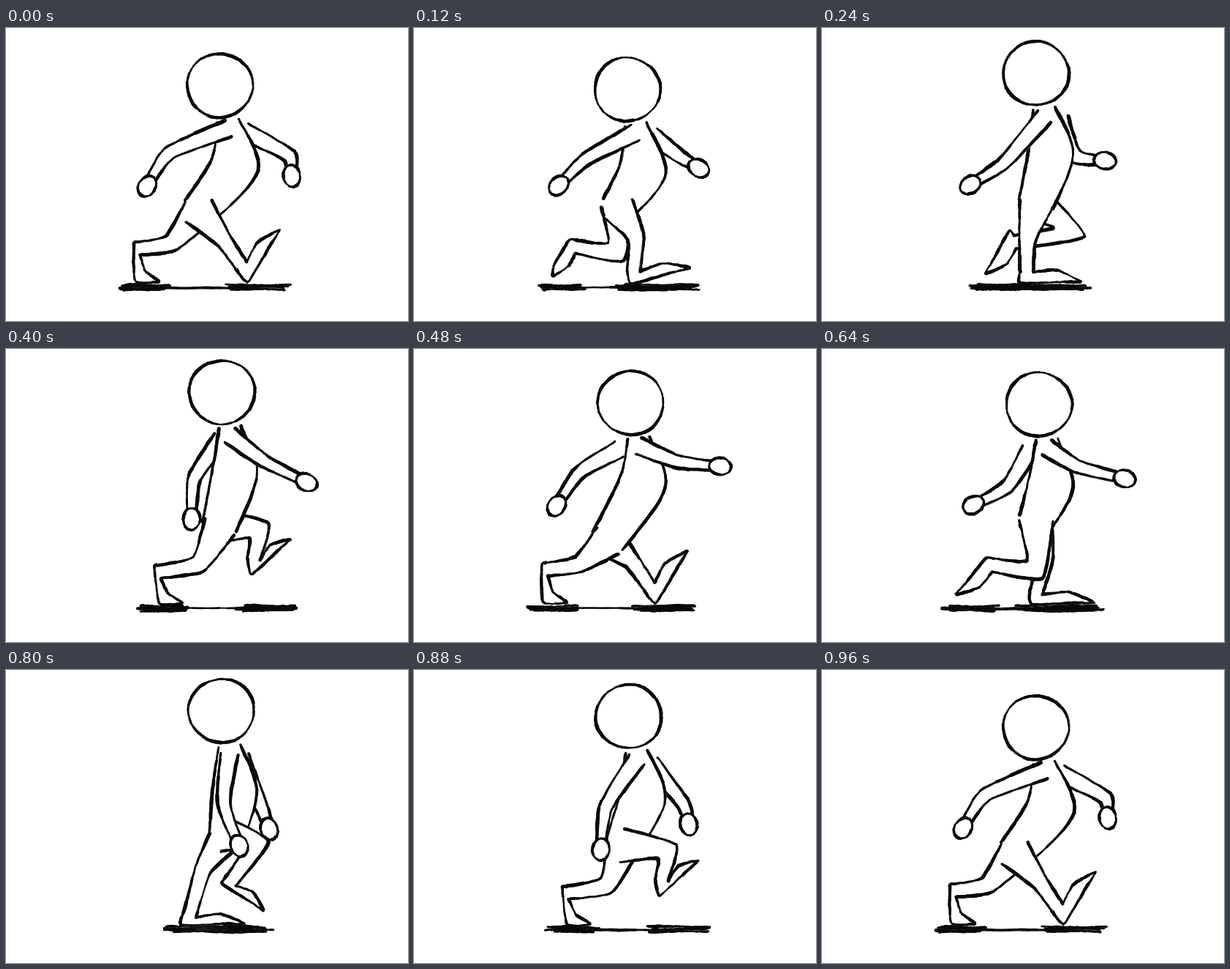
Recreate the animation shown at these times as an HTML page with a canvas. Size 550 by 400 pixels, loop 1000 ms.

```html
<!DOCTYPE html>
<html lang="en">
<head>
<meta charset="utf-8">
<title>Walk cycle</title>
<style>
html, body { margin: 0; width: 100%; height: 100%; overflow: hidden; background: #fff; }
canvas { display: block; }
</style>
</head>
<body>
<canvas id="stage" width="550" height="400"></canvas>
<script>
const ctx = document.getElementById('stage').getContext('2d');
const STEP = 40, LOOP = 1000, CYCLE = 960, FLOOR = 349, TAU = 2 * Math.PI;

// Key joints: time, then x,y pairs. Both legs share one track, half a cycle apart.
const HIP = [
  [0, 264, 250], [240, 293, 240], [400, 292, 243],
  [480, 265, 262], [640, 293, 235], [800, 302, 226]
];
// knee, ankle, heel, toe
const LEG = [
  [0, 298, 290, 322, 324, 331, 347, 374, 276],
  [160, 305, 285, 293, 333, 287, 348, 372, 346],
  [240, 281, 290, 280, 333, 271, 348, 354, 346],
  [320, 270, 272, 251, 335, 240, 348, 326, 346],
  [400, 263, 294, 210, 304, 203, 298, 241, 347],
  [480, 225, 294, 182, 301, 175, 295, 209, 346],
  [640, 291, 301, 234, 295, 224, 286, 184, 335],
  [720, 338, 279, 264, 292, 256, 277, 224, 335],
  [800, 342, 240, 307, 289, 296, 292, 352, 328],
  [880, 346, 248, 339, 286, 336, 308, 389, 260]
];
// elbow, hand
const NEAR_ARM = [
  [0, 223, 171, 193, 216], [240, 249, 184, 203, 214], [400, 353, 153, 411, 182],
  [480, 361, 154, 419, 160], [640, 349, 160, 414, 177], [800, 298, 182, 319, 240]
];
const FAR_ARM = [
  [0, 387, 174, 391, 202], [240, 347, 175, 387, 181], [400, 258, 176, 254, 232],
  [480, 226, 169, 195, 214], [640, 253, 188, 207, 213], [800, 350, 188, 360, 217]
];

let seed = 1;
const rand = () => (seed = seed * 16807 % 2147483647) / 2147483647;
const wob = a => (rand() * 2 - 1) * a;
const clamp = v => Math.max(0, Math.min(1, v));
const lerp = (a, b, u) => a + (b - a) * u;
const mid = (p, q, u) => [lerp(p[0], q[0], u), lerp(p[1], q[1], u)];
const move = (p, dir, d) => [p[0] + dir[0] * d, p[1] + dir[1] * d];
const unit = (p, q) => {
  const d = Math.hypot(q[0] - p[0], q[1] - p[1]) || 1;
  return [(q[0] - p[0]) / d, (q[1] - p[1]) / d];
};

// Joints at time t, each swinging in an arc around the pivot.
function sample(track, t, pivot) {
  t %= CYCLE;
  const i = track.findLastIndex(k => k[0] <= t), a = track[i];
  const b = track[(i + 1) % track.length];
  const u = (t - a[0]) / ((b[0] || CYCLE) - a[0]), out = [];
  const polar = (k, j) => {
    const x = k[j] - pivot[0], y = k[j + 1] - pivot[1];
    return [Math.hypot(x, y), Math.atan2(x, y)];
  };
  for (let j = 1; j < a.length; j += 2) {
    const [r, th] = mid(polar(a, j), polar(b, j), u);
    out.push([pivot[0] + r * Math.sin(th), Math.min(FLOOR, pivot[1] + r * Math.cos(th))]);
  }
  return out;
}

// Front and back outline of a chain of joints with the given thicknesses.
function sides(joints, widths) {
  const last = joints.length - 1, front = [], back = [];
  joints.forEach((p, i) => {
    const a = unit(joints[Math.max(0, i - 1)], joints[Math.max(1, i)]);
    const b = unit(joints[Math.min(last - 1, i)], joints[Math.min(last, i + 1)]);
    const dir = unit([0, 0], [a[0] + b[0], a[1] + b[1]]);
    const miter = Math.max(.5, dir[0] * a[0] + dir[1] * a[1]);
    const normal = [dir[1], -dir[0]], d = widths[i] / 2 / miter;
    front.push(move(p, normal, d));
    back.push(move(p, normal, -d));
  });
  return [front, back];
}

function spline(pts, tension) {
  const out = [], n = pts.length, at = i => pts[Math.max(0, Math.min(n - 1, i))];
  for (let i = 0; i < n - 1; i++) {
    const [p, a, b, q] = [at(i - 1), at(i), at(i + 1), at(i + 2)];
    for (let s = 0; s < 10; s++) {
      const u = s / 10, v = u * u, w = v * u;
      out.push([0, 1].map(k =>
        a[k] * (2 * w - 3 * v + 1) + b[k] * (3 * v - 2 * w) +
        tension / 2 * ((b[k] - p[k]) * (w - 2 * v + u) + (q[k] - a[k]) * (w - v))));
    }
  }
  return [...out, pts[n - 1]];
}

// One pass of a brush whose pressure drifts along the way.
function brush(pts, width, color) {
  const phase = rand() * TAU, freq = .25 + rand() * .2;
  ctx.strokeStyle = color;
  for (let i = 1; i < pts.length; i++) {
    ctx.lineWidth = Math.max(.6, width * (1 + .3 * Math.sin(phase + i * freq)) + wob(.6));
    ctx.beginPath();
    ctx.moveTo(...pts[i - 1]);
    ctx.lineTo(...pts[i]);
    ctx.stroke();
  }
}

function ink(curve, width = 3.8) {
  const dx = wob(1.6), dy = wob(1);
  brush(curve.map(([x, y]) => [x + dx, y + dy]), 1.6, '#555');
  brush(curve.map(([x, y]) => [x + wob(.4), y + wob(.4)]), width, '#0a0a0a');
}

function fill(pts) {
  ctx.fillStyle = '#fff';
  ctx.beginPath();
  pts.forEach(p => ctx.lineTo(...p));
  ctx.fill();
}

function limb(joints, widths, tension) {
  const [front, back] = sides(joints, widths).map(s => spline(s, tension));
  fill([...front, ...back.toReversed()]);
  ink(front);
  ink(back);
}

function oval([cx, cy], rx, ry, tilt = 0, width = 3.6) {
  const c = Math.cos(tilt), s = Math.sin(tilt), start = rand() * TAU;
  const ring = Array.from({ length: 45 }, (_, i) => {
    const th = start + i * TAU / 44, swell = 1 + .012 * Math.sin(3 * th + start);
    const x = rx * swell * Math.cos(th), y = ry * swell * Math.sin(th);
    return [cx + x * c - y * s, cy + x * s + y * c];
  });
  fill(ring);
  ink(ring, width);
}

function drawLeg(hip, [knee, ankle, heel, toe]) {
  const chain = [hip, knee, ankle], widths = [46, 22, 18];
  const [front, back] = sides(chain, widths).map(s => s[2]);
  const along = unit(heel, toe), sole = [-along[1], along[0]];
  // A raised heel over a planted toe bends the foot at the ball.
  const push = 32 * clamp(along[1]) * clamp((toe[1] - 337) / 8);
  const [bx, by] = move(mid(heel, toe, .7), sole, push);
  const instep = move(mid(front, toe, .5), sole, push * .6 - 9);
  const foot = spline([front, instep, toe, [bx, Math.min(FLOOR, by)], heel, back], .5);
  fill(foot);
  ink(foot, 3.4);
  limb(chain, widths, .5);
}

function drawArm(shoulder, [elbow, hand]) {
  const [x, y] = unit(elbow, hand);
  limb([shoulder, elbow, hand], [24, 17, 12], .6);
  oval(hand, 15, 11.5, Math.atan2(y, x), 3.2);
}

function drawGround(feet) {
  const streak = (from, to, y, w) => ink(spline(
    [[from + wob(8), y + wob(1)], [(from + to) / 2, y + wob(1)], [to + wob(8), y + wob(1)]], 1), w);
  const span = pts => {
    const xs = pts.map(p => p[0]);
    return [Math.min(...xs) - 16, Math.max(...xs) + 8];
  };
  streak(...span(feet.flat()), 354, 3);
  for (const foot of feet)
    for (let y = 351; y < 358; y += 2) streak(...span(foot), y, 3.4);
}

function draw(step) {
  const t = step * STEP, a = TAU * t / CYCLE;
  seed = 977 + step * 7919;
  for (let i = 0; i < 4; i++) rand();

  const head = [
    294.5 - 2 * Math.cos(a) - 1.5 * Math.sin(a),
    69 + 7 * Math.cos(2 * a) + 13 * Math.sin(2 * a) + 2.5 * Math.cos(a)
  ];
  const neck = [head[0] + 11, head[1] + 48], chest = [313, head[1] + 108];
  const [hip] = sample(HIP, t, [290, 130]);
  const [nearLeg, farLeg] = [0, CYCLE / 2].map(lag => sample(LEG, t + lag, [290, 240]));
  const [nearArm, farArm] = [NEAR_ARM, FAR_ARM].map(track => sample(track, t, [300, 120]));

  ctx.fillStyle = '#fff';
  ctx.fillRect(0, 0, 550, 400);
  ctx.lineCap = 'round';
  drawGround([nearLeg.slice(1), farLeg.slice(1)]);
  drawArm([neck[0] + (farArm[1][0] - 300) * .25, neck[1] + 15], farArm);
  drawLeg(hip, farLeg);
  limb([neck, chest, hip], [30, 60, 48], 1);
  drawLeg(hip, nearLeg);
  drawArm([neck[0], neck[1] + 11], nearArm);
  oval(head, 45, 43.5);
}

function tick(now) {
  draw(Math.floor(now % LOOP / STEP) % 24);
  requestAnimationFrame(tick);
}
requestAnimationFrame(tick);
</script>
</body>
</html>
```
